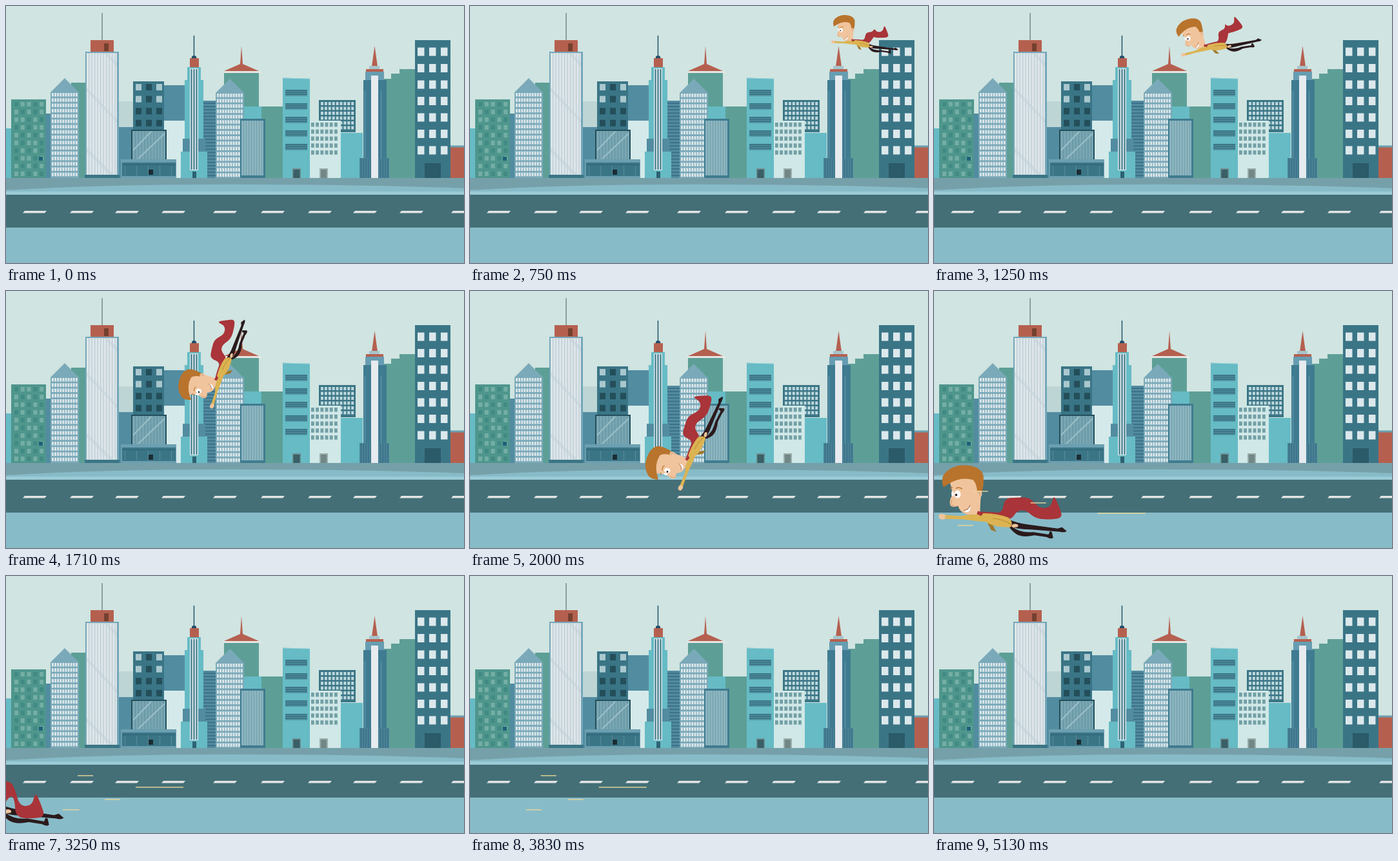
Recreate the animation shown at these times as an HTML page with a canvas. Size 710 by 399 pixels, loop 5.18 s.

```html
<!DOCTYPE html>
<html lang="en">
<head>
<meta charset="utf-8">
<title>Hero over the city</title>
<style>
html, body { margin: 0; width: 100%; height: 100%; overflow: hidden; background: #88bbc8; }
canvas { display: block; }
</style>
</head>
<body>
<canvas id="stage" width="710" height="399"></canvas>
<script>
const W = 710, H = 399, LOOP = 5180, GROUND = 267;
const view = document.getElementById('stage').getContext('2d');
const city = document.createElement('canvas');
city.width = W;
city.height = H;
let g = city.getContext('2d');

const TEAL = '#66bbc5', GREEN = '#5d9f96', BLUE = '#528ca1', DEEP = '#3a7586',
      STEEL = '#7aa9b9', RED = '#b5604f', DARK = '#234e5a', PALE = '#dfe6e9', MINT = '#d0e8e7';

const clamp = v => Math.min(1, Math.max(0, v));
const sigmoid = v => 1 / (1 + Math.exp(-v));

function box(color, x1, y1, x2, y2 = GROUND) {
  g.fillStyle = color;
  g.fillRect(x1, y1, x2 - x1, y2 - y1);
}
function shape(color, d) {
  g.fillStyle = color;
  g.fill(new Path2D(d));
}
function stroke(color, width, d) {
  g.strokeStyle = color;
  g.lineWidth = width;
  g.stroke(new Path2D(d));
}
function dot(color, x, y, rx, ry = rx) {
  g.fillStyle = color;
  g.beginPath();
  g.ellipse(x, y, rx, ry, 0, 0, 7);
  g.fill();
}
// color may be a function of column and row
function grid(color, x, y, cols, rows, dx, dy, w, h) {
  for (let r = 0; r < rows; r++)
    for (let c = 0; c < cols; c++) {
      g.fillStyle = typeof color == 'function' ? color(c, r) : color;
      g.fillRect(x + c * dx, y + r * dy, w, h);
    }
}
function bars(color, x1, x2, y1, y2, count, w = 1) {
  grid(color, x1, y1, count, 1, (x2 - x1) / count, 0, w, y2 - y1);
}
function gabled(x, y) {
  box(STEEL, x, y, x + 44);
  shape(STEEL, `M${x} ${y}l22 -22l22 22Z`);
  grid('#dce7ea', x + 2, y + 1, 10, 16, 4.1, 8.25, 2.9, 5.5);
}

function drawCity() {
  box('#d0e4e1', 0, 0, W, H);

  // distant blocks
  box(TEAL, 0, 190, 8);
  box(BLUE, 62, 167, 69);
  box(GREEN, 101, 119, 124);
  box('#bdd5d5', 174, 148, 198);
  box(BLUE, 174, 188, 198);
  box(BLUE, 245, 123, 278, 179);
  box('#d4eaea', 245, 178, 278);
  box(BLUE, 305, 147, 326);
  grid('#3c7086', 306, 150, 1, 23, 0, 5.1, 19, 2);
  box(GREEN, 338, 104, 392);
  box('#e6e6e4', 336, 101, 396, 104);
  shape(RED, 'M338 101L363 90L365 62L367 90L392 101Z');
  box(TEAL, 367, 156, 396);
  box(GREEN, 396, 156, 429);
  box(TEAL, 519, 197, 553);
  shape(GREEN, 'M586 267V113H597V105H610V98H634V267Z');

  // green block
  box('#4f968d', 8, 145, 62);
  grid((c, r) => (c * 3 + r * 5) % 7 < 3 ? '#428a84' : '#74aea4', 13, 149, 5, 10, 9.8, 12, 6, 7);
  box('#1f6078', 51, 234, 57, 240);

  gabled(69, 134);

  // tall tower
  box('#5a6a6e', 148.5, 11, 149.6, 53);
  box(RED, 131, 53, 167, 71);
  box('#74402f', 152, 58, 159, 70);
  box('#74a7b9', 123, 71, 175, 263);
  box(PALE, 125, 73, 172, 262);
  bars('#b9ccd5', 128, 173, 73, 262, 10, 1.3);
  g.globalAlpha = 0.55;
  shape('#c4d3da', 'M152 73H157L172 88V94ZM125 126L172 176V182L125 132ZM125 220L167 262H160L125 227Z');
  g.globalAlpha = 1;
  box(DEEP, 122, 262, 176);

  // office and glass hall
  box(DEEP, 197, 117, 245, 193);
  grid((c, r) => r < 2 && c != 1 ? '#a9c8ce' : DARK, 201, 121, 3, 4, 16, 18.6, 9, 10);
  box(DARK, 194, 192, 249, 239);
  box('#79a6b2', 196, 194, 247, 238);
  bars('#5f909f', 200, 248, 194, 238, 10);
  stroke('#9bbfc7', 2, 'M197 224L225 195M205 237L246 198');
  box('#6b9fb0', 178, 238, 264);
  box(DEEP, 180, 243, 263, 264);
  box('#2d6272', 180, 246, 263, 247);
  bars('#5a8c9b', 184, 274, 248, 263, 5);
  box('#1b2c33', 221, 254, 228, 262);

  // slim tower
  box('#23546a', 290.7, 46, 292.2, 80);
  dot('#234e6a', 291.5, 80, 3.7, 3);
  box(RED, 285, 81, 299, 95);
  box(TEAL, 281, 95, 302, 116);
  box(TEAL, 277, 115, 306);
  box(BLUE, 274, 206, 309, 226);
  box(TEAL, 271, 226, 312);
  box('#e0ecee', 285, 97, 298, 255);
  bars(DEEP, 286.5, 298.5, 98, 254, 3, 2);
  box('#2d6272', 289, 257, 295);

  gabled(325, 135);
  box('#3f7b8f', 363, 175, 402);
  box('#8bb4bf', 365, 178, 399, 263);
  bars('#719fac', 368, 400, 178, 263, 8);

  // louvred block
  shape(TEAL, 'M429 111.5L471 113V267H429Z');
  stroke('#93d0d6', 1, 'M429 112L471 113');
  for (let y = 130; y < 220; y += 21) {
    box(DEEP, 433, y, 467, y + 9.5);
    grid('#62a0ad', 433, y + 2, 1, 3, 0, 3, 34, 0.7);
  }
  box('#6e8f92', 444, 252, 457);
  box('#3a5f66', 445.5, 254, 455.5);

  // white block and its neighbour
  box(DEEP, 485, 146, 542, 196);
  grid('#bcd8dc', 488, 149, 9, 6, 5.9, 7.5, 4, 5);
  box(MINT, 471, 178, 519);
  grid('#729fa5', 473, 181, 6, 5, 7.2, 10.8, 4.8, 6.5);
  box('#9caeab', 486, 252, 499);
  box('#728787', 488, 254, 497);

  // spired tower
  shape(RED, 'M567 94L571.5 62L576 94Z');
  box('#a6c4cc', 563, 93, 579, 98);
  box(RED, 558, 98, 585, 102);
  box('#679db2', 557, 102, 586, 116);
  box('#3f7b91', 554, 115, 590);
  bars('#679db2', 556, 606, 132, 236, 2);
  box('#4a8297', 548, 236, 594);
  bars('#386d83', 550, 595, 237, GROUND, 12, 1.2);
  box('#e6ebef', 566, 108, 577);

  // right side
  box(DEEP, 634, 53, 689);
  grid('#dbe8ec', 638, 64.5, 3, 7, 18, 25.5, 10.5, 13);
  box('#2b5a68', 649, 244, 674);
  box(RED, 689, 219, W);
  box('#6b9fb0', 689, 216.5, W, 219.5);

  // ground and road
  box('#76a0a9', 0, GROUND, W, 292);
  shape('#87bbc8', 'M0 286Q150 277 350 277T710 283V292H0Z');
  box('#9acbd6', 0, 288, W, 293);
  box('#446f77', 0, 293, W, 344);
  box('#88bbc8', 0, 344, W, H);
  // the dashes repeat as a tile of five
  for (const tile of [0, 369])
    for (const x of [26, 99, 169, 241, 321])
      shape('#e2e4e3', `M${tile + x + 3} 318h34l-3 3.5h-34Z`);
}

// Closed smooth curve steered by a list of points
function blob(color, points) {
  const mid = (a, b) => [(a[0] + b[0]) / 2, (a[1] + b[1]) / 2];
  g.fillStyle = color;
  g.beginPath();
  g.moveTo(...mid(points[points.length - 1], points[0]));
  points.forEach((p, i) => g.quadraticCurveTo(...p, ...mid(p, points[(i + 1) % points.length])));
  g.fill();
}

function drawCape(t) {
  const lift = Math.sin((t - 1710) / 583 * 2 * Math.PI);
  const flap = ([x, y]) => {
    const w = clamp((x - 135) / 25);
    return [x - 29 * w * Math.abs(lift), y - 23 * w * lift];
  };
  blob('#a93439', [
    [66, 342], [90, 343], [107, 345], [110, 322], [130, 321], [151, 322], [166, 340],
    [184, 338], [188, 318], [196, 336], [202, 354], [186, 357], [160, 356],
    [144, 341], [130, 341], [119, 357], [92, 348], [68, 348]
  ].map(flap));
}

function drawHero(t) {
  const skin = '#f0c49d', shirt = '#dcb352', black = '#2a1a1c', hair = '#b8742c';
  // steady glide to the left with a dive in the middle
  const x = 864 - 0.336 * t + 210 * sigmoid((t - 1838) * 0.0082);
  const y = 61.5 + 300.5 * sigmoid((t - 1949) * 0.00655);
  const angle = -82 * Math.exp(-(((t - 1835) / 475) ** 2));
  const scale = 0.635 + 0.000224 * (t - 1250);
  g.save();
  g.translate(x, y);
  g.rotate(angle * Math.PI / 180);
  g.scale(scale, scale);
  g.translate(-106.5, -361.5);

  // legs
  shape(black, 'M113 358Q120 368 134 373Q142 376 154 375L178 379L180 374L183 375L185 384Q182 387 175 383L156 380Q138 384 128 378Q117 370 113 358Z');
  shape(black, 'M112 353Q128 361 146 363L192 370L199 368L206 374Q203 377 195 375L150 371Q126 370 114 365Z');
  drawCape(t);

  // torso, tie and arms
  shape('#a0782c', 'M82 357L92 364L97 374L89 371Z');
  shape(shirt, 'M70 345Q95 344 116 352Q125 361 119 367Q98 368 83 360Z');
  shape(shirt, 'M84 346Q63 344 43 349L17 347V353L45 354Q65 357 88 359Z');
  shape(skin, 'M18 346.5Q13 344 9 346Q7 349 9 352Q13 355 18 353Z');
  stroke('#b98c35', 1.2, 'M92 353Q110 355 122 364');
  dot(skin, 126, 365, 5, 3.2);
  stroke(black, 0.8, 'M124 368L130 367');

  // head
  shape(skin, 'M57 332L73 326L72 345Q66 349 58 345Z');
  shape(skin, 'M24 293Q30 304 29 317Q23 327 27 333Q32 336 38 333Q41 343 51 346Q64 349 70 339Q75 325 74 297Q50 280 24 293Z');
  shape(hair, 'M16 304Q12 293 16 285Q28 269 50 270Q73 271 78 286Q79 301 75 313L68 312Q68 300 62 293Q42 287 22 300Z');
  dot(skin, 71, 315, 4.5, 5.5);
  stroke('#c98f68', 1, 'M69 313Q74 312 72 318');
  dot('#fff', 37.5, 315, 5, 6);
  dot('#fff', 30, 314, 1.8, 4);
  dot(black, 35.5, 316, 1.8);
  stroke(hair, 1.5, 'M35 306Q40 303 45 307M26 306L30 304');
  stroke('#d29c75', 1, 'M29 323Q25 333 35 334');
  shape('#fff', 'M47 340Q54 340 57 333Q59 341 52 343Q49 343 47 340Z');
  stroke('#9c5a43', 1, 'M47 340Q54 340 57 332');
  shape('#a93439', 'M69 341L77 345L74 349L67 346Z');
  g.restore();
}

// final y, final x, delay
const STREAKS = [[311, 60, 100], [329, 150, 250], [348, 102, 0], [364, 37, 120]];

function drawStreaks(t) {
  for (let start = 2290; start <= 3440; start += 575) {
    const u = t - start, left = 590 - u;
    if (u <= 0 || u > 597) continue;
    for (const [endY, endX, delay] of STREAKS) {
      const age = u - delay;
      if (age < 0 || age > 495) continue;
      const x = endX + 0.2423 * left + 3.83e-5 * left * left;
      const y = endY - 0.005 * left;
      box('#ead89a', x, y - 0.7, x + 74 - 50 * clamp((age - 150) / 120), y + 0.7);
    }
  }
}

drawCity();
g = view;
function tick(now) {
  const t = now % LOOP;
  g.drawImage(city, 0, 0);
  if (t >= 330 && t < 3540) drawHero(t);
  drawStreaks(t);
  requestAnimationFrame(tick);
}
requestAnimationFrame(tick);
</script>
</body>
</html>
```
